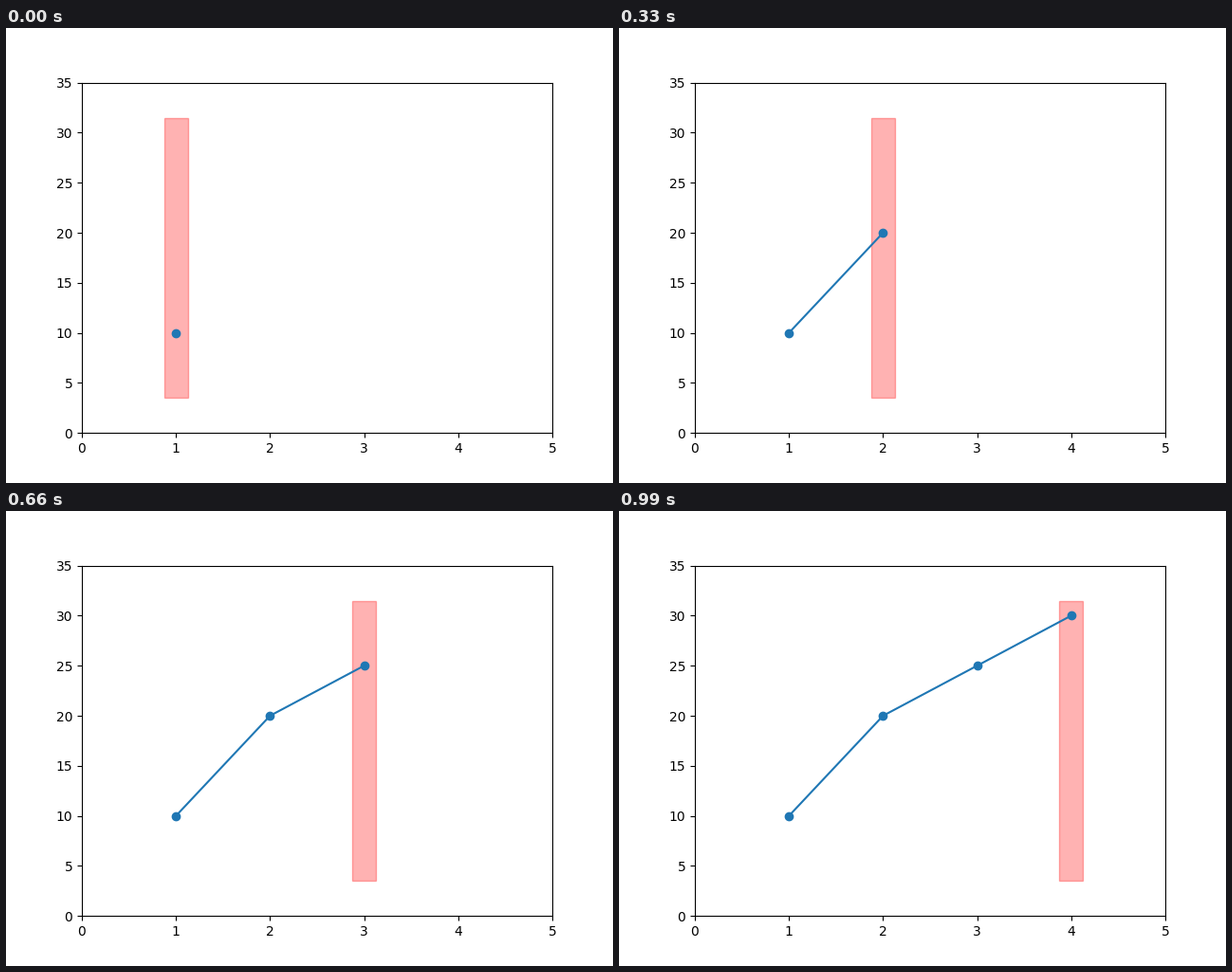
Recreate the animation shown at these times as a matplotlib script. Size 640 px wide and 480 px high, loop 1320 ms.

```python
import matplotlib.pyplot as plt
from matplotlib.animation import FuncAnimation

X = [1, 2, 3, 4]
Y = [10, 20, 25, 30]
BAND_WIDTH = 0.25

fig, ax = plt.subplots(figsize=(6.4, 4.8), dpi=100)
ax.set_xlim(0, 5)
ax.set_ylim(0, 35)

line, = ax.plot([], [], "o-", color="tab:blue")
band = ax.axvspan(X[0] - BAND_WIDTH / 2, X[0] + BAND_WIDTH / 2,
                  ymin=0.1, ymax=0.9, color="red", alpha=0.3)


def update(i):
    """Reveal points up to i and move the band onto the newest one."""
    line.set_data(X[:i + 1], Y[:i + 1])
    band.set_x(X[i] - BAND_WIDTH / 2)
    return line, band


anim = FuncAnimation(fig, update, frames=len(X), interval=330,
                     repeat=True, repeat_delay=0)
plt.show()
```
